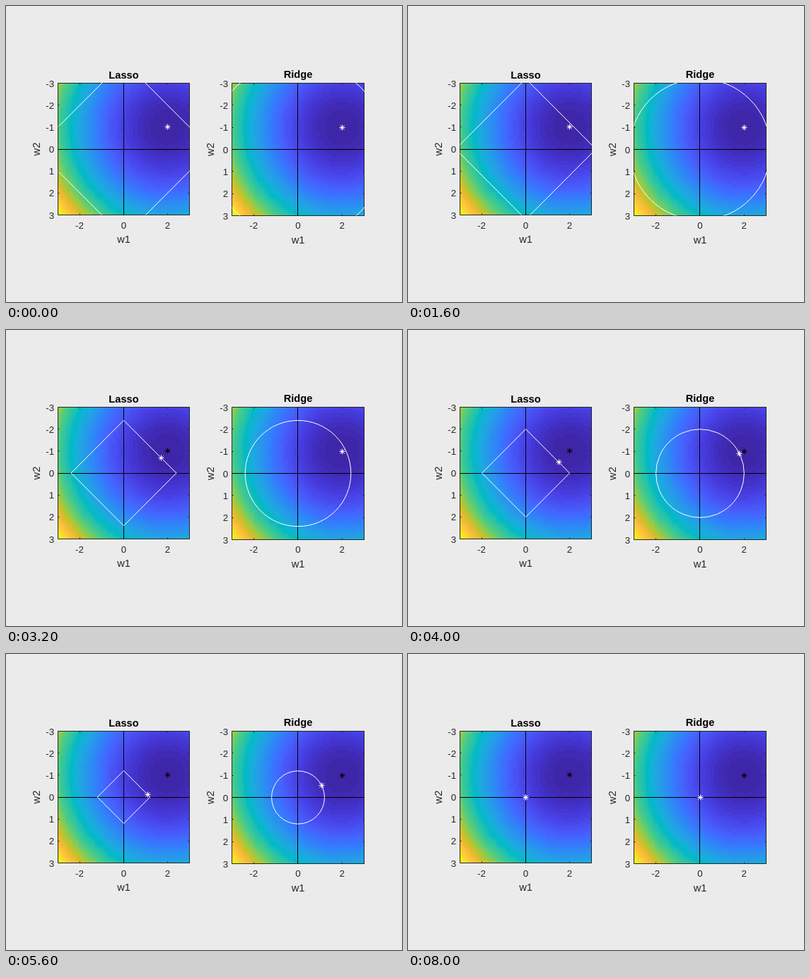
Recreate the animation shown at these times as an HTML page with a canvas. Size 560 px wide and 420 px high, loop 8100 ms.

```html
<!DOCTYPE html>
<html lang="en">
<head>
<meta charset="utf-8">
<title>Lasso and Ridge</title>
<style>
html, body { margin: 0; width: 100%; height: 100%; overflow: hidden; background: #ebebeb; }
canvas, svg { position: absolute; left: 0; top: 0; width: 560px; height: 420px; }
text { font-family: "Liberation Sans", Arial, sans-serif; font-size: 13.33px; fill: #262626; }
.label { font-size: 14.67px; }
.title { font-size: 14.67px; font-weight: bold; fill: #000; }
.mid { text-anchor: middle; }
.end { text-anchor: end; }
path { fill: none; stroke-width: 1; }
.frame { stroke: #262626; }
.black { stroke: #000; }
.white { stroke: #fff; }
</style>
</head>
<body>
<canvas width="560" height="420"></canvas>
<svg width="560" height="420" viewBox="0 0 560 420"></svg>
<script>
const STEP = 100, STEPS = 81, R0 = 4;
const BEST = [2, -1];
const parula = ('3e26a8 4332cb 4741e5 4852f4 4563fd 3875fe 2e87f7 2797eb 20a5e3 12b1d6 02bac3 ' +
  '24c1ae 37c897 57cc7a 81cc59 abc739 d1bf27 f0ba36 fec338 fad62d f5e924 f9fb15')
  .split(' ').map(h => [0, 2, 4].map(i => parseInt(h.slice(i, i + 2), 16)));

const svg = document.querySelector('svg');
const ctx = document.querySelector('canvas').getContext('2d');

function add(parent, tag, attrs, text) {
  const el = document.createElementNS('http://www.w3.org/2000/svg', tag);
  for (const k in attrs) el.setAttribute(k, attrs[k]);
  if (text !== undefined) el.textContent = text;
  return parent.appendChild(el);
}

// 64-level colour map with a stop every third level
function shade(v) {
  const level = Math.min(63, Math.floor(v * 64));
  const i = Math.floor(level / 3), f = (level % 3) / 3;
  const a = parula[i], b = parula[Math.min(i + 1, 21)];
  return 'rgb(' + a.map((c, k) => Math.round(c + (b[k] - c) * f)) + ')';
}

const snap = v => Math.floor(v) + 0.5;

function star(x, y) {
  x = snap(x);
  y = snap(y);
  return `M${x - 4} ${y}h8M${x} ${y - 4}v8M${x - 3} ${y - 3}l6 6M${x - 3} ${y + 3}l6 -6`;
}

function diamond(p, r) {
  const a = r * p.sx, b = r * p.sy;
  return `M${p.cx - a} ${p.cy}l${a} ${-b}l${a} ${b}l${-a} ${b}z`;
}

function circle(p, r) {
  const a = r * p.sx, b = r * p.sy;
  return `M${p.cx - a} ${p.cy}a${a} ${b} 0 1 1 ${2 * a} 0a${a} ${b} 0 1 1 ${-2 * a} 0z`;
}

// Closest point to BEST inside each ball
function lassoFit(r) {
  if (r >= 3) return BEST;
  const cut = (3 - r) / 2;
  return cut < 1 ? [2 - cut, cut - 1] : [r, 0];
}

function ridgeFit(r) {
  const k = Math.min(1, r / Math.sqrt(5));
  return BEST.map(v => v * k);
}

function heatmap(p) {
  const edges = (c, s) => Array.from({ length: 62 }, (_, i) =>
    Math.round(c + s * Math.max(-3, Math.min(3, -3.05 + i / 10))));
  const xs = edges(p.cx, p.sx), ys = edges(p.cy, p.sy);
  for (let j = 0; j < 61; j++) {
    for (let i = 0; i < 61; i++) {
      const dx = i / 10 - 3 - BEST[0], dy = j / 10 - 3 - BEST[1];
      ctx.fillStyle = shade((dx * dx + dy * dy) / 41);
      ctx.fillRect(xs[i], ys[j], xs[i + 1] - xs[i], ys[j + 1] - ys[j]);
    }
  }
}

function makePlot(p) {
  const { l, r, t, b } = p;
  p.cx = (l + r) / 2;
  p.cy = (t + b) / 2;
  p.sx = (r - l) / 6;
  p.sy = (b - t) / 6;
  const X = w => p.cx + w * p.sx, Y = w => p.cy + w * p.sy;
  heatmap(p);

  const clip = add(add(svg, 'defs'), 'clipPath', { id: p.name });
  add(clip, 'rect', { x: l, y: t - 0.5, width: r - l + 0.5, height: b - t + 0.5 });

  let d = `M${l} ${t}H${r}V${b}H${l}z`;
  for (const w of [-2, 0, 2]) {
    const x = snap(X(w) - 0.1);
    d += `M${x} ${t}v2M${x} ${b}v-2`;
    add(svg, 'text', { x: X(w) - (w < 0 ? 0.5 : 0), y: p.tickY, class: 'mid' }, w);
  }
  for (let w = -3; w <= 3; w++) {
    const y = snap(Y(w));
    d += `M${l} ${y}h2M${r} ${y}h-2`;
    add(svg, 'text', { x: l - 5.3, y: Y(w) + 5, class: 'end' }, w);
  }
  add(svg, 'path', { d, class: 'frame' });
  add(svg, 'path', { d: `M${l} 203.5H${r}M${snap(p.cx - 0.1)} ${t}V${b}`, class: 'black' });
  add(svg, 'path', { d: star(X(BEST[0]), Y(BEST[1])), class: 'black' });

  add(svg, 'text', { x: p.cx, y: p.titleY, class: 'title mid' }, p.name);
  add(svg, 'text', { x: p.cx, y: p.labelY, class: 'label mid' }, 'w1');
  add(svg, 'text', {
    transform: `translate(${l - 25.5} ${p.cy}) rotate(-90)`, class: 'label mid'
  }, 'w2');

  const group = add(svg, 'g', { 'clip-path': `url(#${p.name})` });
  const ball = add(group, 'path', { class: 'white' });
  const mark = add(svg, 'path', { class: 'white' });
  return radius => {
    const [x, y] = p.fit(radius);
    ball.setAttribute('d', radius > 0 ? p.shape(p, radius) : '');
    mark.setAttribute('d', star(X(x), Y(y)));
  };
}

const plots = [
  { name: 'Lasso', l: 73.5, r: 259.5, t: 109.5, b: 296.5, titleY: 103, tickY: 316, labelY: 336,
    shape: diamond, fit: lassoFit },
  { name: 'Ridge', l: 319.5, r: 506.5, t: 109.5, b: 297.5, titleY: 102, tickY: 316, labelY: 337,
    shape: circle, fit: ridgeFit }
].map(makePlot);

let last = -1;
const start = performance.now();
function draw(now) {
  const step = Math.floor(Math.max(0, now - start) / STEP) % STEPS;
  if (step !== last) {
    last = step;
    plots.forEach(update => update(R0 * (1 - step / (STEPS - 1))));
  }
  requestAnimationFrame(draw);
}
draw(start);
</script>
</body>
</html>
```
